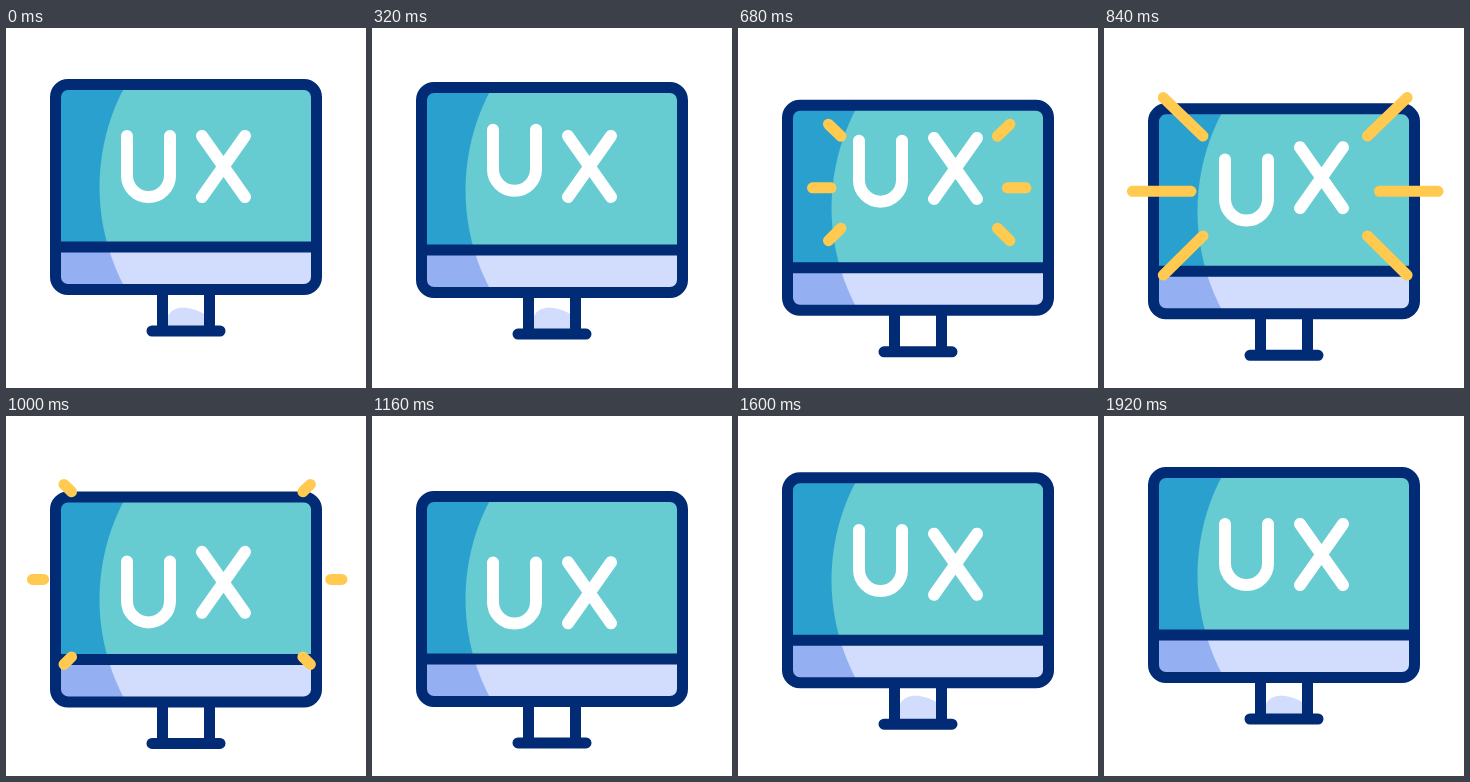
An HTML page with a canvas for the animation above (1.96 s loop, 360x360 px).

```html
<!DOCTYPE html>
<html lang="en">
<head>
<meta charset="utf-8">
<title>UX monitor</title>
<style>
html, body { margin: 0; width: 100%; height: 100%; overflow: hidden; background: #fff; }
canvas { display: block; width: 360px; height: 360px; }
</style>
</head>
<body>
<canvas id="stage"></canvas>
<script>
const LOOP = 1960, STEP = 40, SIZE = 360;
const NAVY = '#022b76', TEAL = '#67ccd1', BLUE = '#2aa0ce';
const PALE = '#d2dcfc', LILAC = '#94b0f3', GOLD = '#ffca4f';

const canvas = document.getElementById('stage');
const ctx = canvas.getContext('2d');
const ratio = window.devicePixelRatio || 1;
canvas.width = canvas.height = Math.round(SIZE * ratio);

// Eased progress from 0 to 1 between times a and b.
function ease(t, a, b) {
  const x = Math.min(1, Math.max(0, (t - a) / (b - a)));
  return (1 - Math.cos(Math.PI * x)) / 2;
}

const drop = t => 24.4 * (ease(t, 160, 855) - ease(t, 1100, 1820));

// Letters hop up, fall below their rest line, then settle.
const hop = t => -19 * ease(t, 60, 590) + 33.5 * ease(t, 590, 1065) - 14.5 * ease(t, 1150, 1680);

function stroke(color, width, path) {
  ctx.strokeStyle = color;
  ctx.lineWidth = width;
  ctx.beginPath();
  path();
  ctx.stroke();
}

function line(x1, y1, x2, y2) {
  ctx.moveTo(x1, y1);
  ctx.lineTo(x2, y2);
}

function fillRect(color, x, y, w, h) {
  ctx.fillStyle = color;
  ctx.fillRect(x, y, w, h);
}

function frame() {
  ctx.beginPath();
  ctx.roundRect(49.5, 56.5, 261, 205, 12.5);
}

function drawMonitor() {
  ctx.save();
  frame();
  ctx.clip();
  fillRect(BLUE, 44, 51, 272, 168);
  fillRect(LILAC, 44, 219, 272, 48);
  ctx.beginPath();
  ctx.arc(305.5, 159, 212, 0, Math.PI * 2);
  ctx.clip();
  fillRect(TEAL, 44, 51, 272, 168);
  fillRect(PALE, 44, 219, 272, 48);
  ctx.restore();
  stroke(NAVY, 11, frame);
  stroke(NAVY, 11, () => line(49.5, 219, 310.5, 219));
}

function drawStand() {
  stroke(NAVY, 11, () => {
    line(156.5, 264, 156.5, 303);
    line(203.5, 264, 203.5, 303);
    line(146, 303, 214, 303);
  });
}

function drawGlow(bottom) {
  ctx.fillStyle = PALE;
  ctx.beginPath();
  ctx.moveTo(162, bottom);
  ctx.lineTo(162, 288);
  ctx.bezierCurveTo(168, 276, 186, 279, 198, 286);
  ctx.lineTo(198, bottom);
  ctx.fill();
}

function drawRays(t) {
  const tip = ease(t, 575, 872), tail = ease(t, 782, 1080);
  if (tip - tail < 0.005) return;
  const rays = [[103, 87.5, 58, 44], [93, 139, 26.5, 139], [103, 179.5, 58, 224]];
  const mix = (a, b, k) => a + (b - a) * k;
  stroke(GOLD, 11, () => {
    for (const [x1, y1, x2, y2] of rays) {
      const xa = mix(x1, x2, tail), xb = mix(x1, x2, tip);
      const ya = mix(y1, y2, tail), yb = mix(y1, y2, tip);
      line(xa, ya, xb, yb);
      line(362.4 - xa, ya, 362.4 - xb, yb);
    }
  });
}

function drawLetters(t) {
  const u = hop(t), x = hop(t - 120);
  stroke('#fff', 12, () => {
    ctx.moveTo(121, 108 + u);
    ctx.lineTo(121, 147.5 + u);
    ctx.arc(142.5, 147.5 + u, 21.5, Math.PI, 0, true);
    ctx.lineTo(164, 108 + u);
  });
  stroke('#fff', 12, () => {
    line(196, 108 + x, 239, 169 + x);
    line(239, 108 + x, 196, 169 + x);
  });
}

function draw(t) {
  const y = drop(t);
  ctx.setTransform(canvas.width / SIZE, 0, 0, canvas.height / SIZE, 0, 0);
  ctx.lineCap = ctx.lineJoin = 'round';
  fillRect('#fff', 0, 0, SIZE, SIZE);
  if (y < 12) drawGlow(303 + y);
  ctx.translate(0, y);
  drawStand();
  drawMonitor();
  drawRays(t);
  drawLetters(t);
}

const start = performance.now();

function tick() {
  const t = Math.max(0, performance.now() - start) % LOOP;
  draw(t < 2 * STEP ? 0 : Math.floor(t / STEP) * STEP);
  requestAnimationFrame(tick);
}

tick();
</script>
</body>
</html>
```
